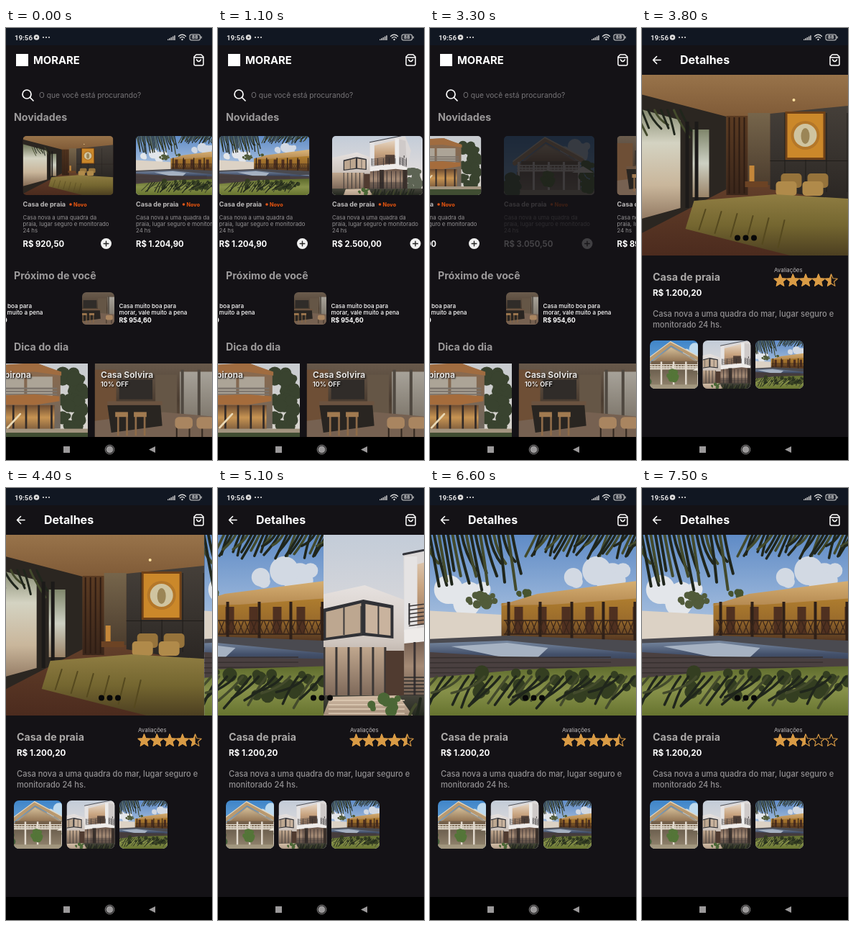
An HTML page that plays this animation: 287x600 px, repeating every 7700 ms.

```html
<!DOCTYPE html>
<html lang="pt">
<head>
<meta charset="utf-8">
<style>
html, body { margin: 0; width: 100%; height: 100%; overflow: hidden; background: #141216; }
svg { display: block; }
text { font-family: Inter, "Open Sans", sans-serif; white-space: pre; }
.clock { font-family: Roboto, sans-serif; }
.shade { text-shadow: 1px 1px 2px #000; }
</style>
</head>
<body>
<script>
const LOOP = 7700, BG = '#141216';
const rect = (x, y, w, h, fill, rx = 0) => `<rect x="${x}" y="${y}" width="${w}" height="${h}" rx="${rx}" fill="${fill}"/>`;
const poly = (points, fill) => `<polygon points="${points}" fill="${fill}"/>`;
const blob = (x, y, rx, ry, fill) => `<ellipse cx="${x}" cy="${y}" rx="${rx}" ry="${ry}" fill="${fill}"/>`;
const disc = (x, y, r, fill) => blob(x, y, r, r, fill);
const line = (d, stroke, w = 1, fill = 'none') =>
  `<path d="${d}" stroke="${stroke}" stroke-width="${w}" fill="${fill}" stroke-linecap="round" stroke-linejoin="round"/>`;
const text = (x, y, size, weight, fill, s, extra = '') =>
  `<text x="${x}" y="${y}" font-size="${size}" font-weight="${weight}" fill="${fill}" ${extra}>${s}</text>`;
const repeat = (n, f) => Array.from({ length: n }, (_, i) => f(i)).join('');
const random = seed => Math.abs(Math.sin(seed * 127.1 + 3) * 4375.85) % 1;

let defs = '', clips = 0;
const clip = (shape, body) => {
  const id = 'clip' + clips++;
  return `<clipPath id="${id}">${shape}</clipPath><g clip-path="url(#${id})">${body}</g>`;
};
const photo = (id, x, y, w, h, r = 0) =>
  clip(rect(x, y, w, h, '#000', r), `<use href="#${id}" x="${x}" y="${y}" width="${w}" height="${h}"/>`);
function shade(...colors) {
  const id = 'shade' + colors.join('').replaceAll('#', '');
  defs += `<linearGradient id="${id}" x2="0" y2="1">${
    colors.map((c, i) => `<stop offset="${i / (colors.length - 1)}" stop-color="${c}"/>`).join('')}</linearGradient>`;
  return `url(#${id})`;
}
const picture = (id, box, body) =>
  defs += `<symbol id="${id}" viewBox="${box}" preserveAspectRatio="xMidYMid slice">${body}</symbol>`;

// Scenery parts
const posts = (n, x, step, y, w, h, fill) => repeat(n, i => rect(x + i * step, y, w, h, fill));
const bars = (n, x, y, w, step, rise, stroke) => repeat(n, i => line(`M${x} ${y + i * step}l${w} ${rise}`, stroke, 1.5));
const leaves = (n, x, step, y, lean, length, w) => repeat(n, i => line(
  `M${x + i * step} ${y}q${lean / 3} ${length / 3} ${lean * (.5 + random(i))} ${length * (.45 + .55 * random(i + n))}`,
  i % 3 ? '#20261c' : '#434a2c', w));
const bush = (n, x, y, w, h, fill, r) => repeat(n, i => disc(x + w * random(i), y + h * random(i + 40), r * (.5 + random(i + 80)), fill));

picture('bedroom', '-59 65 384 251',
  rect(-59, 65, 384, 251, shade('#98734a', '#75502f', '#5f3c28', '#4c2b1e')) +
  poly('-59,80 107,123 107,224 -59,310', '#2b2621') +
  poly('-59,100 43,128 43,250 -59,278', shade('#6d7457', '#d4d3c2', '#c9b69b', '#846a54')) +
  rect(60, 141, 23, 94, shade('#7f866b', '#cdd0c3', '#9b8468')) +
  leaves(8, -20, 9, 114, 16, 40, 3) +
  posts(2, 50, 13, 130, 5, 120, '#1c1a19') + rect(107, 122, 30, 110, shade('#5b3b22', '#39251a')) +
  posts(4, 110, 7, 124, 2, 106, '#2d1c13') + rect(137, 118, 31, 100, shade('#76654b', '#4c3d2e')) +
  poly('168,119 325,103 325,250 168,224', shade('#46403a', '#292522')) +
  posts(4, 188, 29, 118, 1, 110, '#1f1c19') + rect(168, 184, 157, 1, '#1f1c19') +
  rect(189, 116, 56, 67, '#6f4117') + rect(192, 119, 50, 61, '#cb882a') +
  disc(217, 149, 20, '#b47729') + disc(217, 149, 16, '#cfc4a0') + blob(217, 150, 6, 11, '#9b8556') +
  rect(133, 213, 32, 8, '#6c4324') + rect(139, 191, 7, 22, '#c4873a') +
  repeat(4, i => rect(183 + i % 2 * 37 - (i >> 1) * 7, 202 + (i >> 1) * 11, 29, 20, i > 1 ? '#b08a4a' : '#96733b', 5)) +
  poly('62,240 175,231 325,240 325,318 196,316 50,279', shade('#8f7d42', '#746630', '#4a3d20')) +
  repeat(6, i => line(`M${78 + i * 22} ${252 + i * 3}l-9 ${28 + i * 2}`, '#55491f', 2)) +
  disc(201, 100, 2, '#ffe2a0'));

picture('pool', '-48 65 384 251',
  rect(-48, 65, 384, 251, shade('#5f8bc6', '#a9c1df', '#d7dce2')) +
  bush(9, 190, 112, 95, 22, '#d2d9e3', 14) + bush(8, -30, 138, 125, 22, '#e3e6ea', 14) +
  bush(18, 50, 148, 45, 14, '#515b3a', 5) + bush(6, 122, 142, 22, 8, '#47542f', 4) +
  poly('-48,168 100,176 100,211 -48,214', '#dcd2c5') +
  poly('100,160 336,146 336,216 100,208', shade('#b3812f', '#9c6d2c', '#4b3020')) +
  poly('98,163 150,147 336,123 336,150 170,162', shade('#dbb578', '#b58a52')) +
  posts(6, 118, 33, 165, 12, 38, '#4f3020') + posts(6, 108, 44, 158, 4, 54, '#2f2018') +
  repeat(26, i => line(`M${106 + i * 9} 185l7 17m0 -17l-7 17`, '#38251a', 1.2)) +
  bars(2, 104, 184, 232, 19, 0, '#2f2018') +
  poly('-48,212 110,205 336,214 336,232 -48,222', '#4a4a50') +
  poly('-48,217 108,212 336,234 336,250 100,238 -48,228', shade('#7889a1', '#43506a', '#323849')) +
  poly('30,220 108,215 165,222 150,236 100,235', '#a6b2c2') +
  poly('-48,225 100,234 336,238 336,252 130,252 -48,272', '#4a4040') +
  bars(4, -48, 236, 300, 7, -1, '#37302f') +
  poly('-48,268 130,252 336,246 336,316 -48,316', shade('#5d6a2c', '#87914a', '#66732f')) +
  bush(34, 40, 255, 260, 34, '#343e21', 7) + leaves(26, 10, 11, 262, -34, 44, 3.5) +
  leaves(26, -45, 6.4, 64, 14, 78, 4) + leaves(34, 150, 5.5, 62, -16, 36, 3.5));

picture('house', '-48 65 384 251',
  rect(-48, 65, 384, 251, shade('#c3ccd8', '#dbd9db', '#e9dfd6')) +
  bush(30, 272, 205, 60, 90, '#5d6454', 12) + bush(20, -48, 225, 55, 65, '#6b705d', 12) +
  poly('-48,158 58,135 115,156 115,292 -48,292', shade('#e6e1df', '#cfc6bf', '#8d7c6f')) +
  poly('0,168 56,155 98,163 98,209 56,205 0,212', '#303136') +
  poly('4,172 53,160 53,201 4,208', '#bda790') + poly('59,161 94,167 94,205 59,201', '#c9b39e') +
  posts(3, 28, 24, 164, 2, 40, '#3c3a3b') +
  rect(-48, 221, 135, 68, shade('#c0a78e', '#7d6859')) + posts(6, 0, 17, 221, 3, 68, '#3b3736') +
  rect(87, 226, 26, 62, '#503b30') +
  poly('112,93 262,66 287,127 270,205 113,212', '#dcd8d7') +
  poly('131,106 219,84 219,184 131,190', shade('#e6d5c2', '#c9a581', '#977660')) +
  rect(178, 145, 40, 38, '#57443a') + poly('236,79 264,86 268,192 236,184', '#cfcac9') +
  rect(113, 95, 18, 105, '#e5e3e3') + rect(219, 77, 17, 117, '#ecebeb') +
  line('M112 92L245 65', '#33343a', 3) + rect(256, 148, 3, 10, '#33302f') +
  posts(5, 119, 25, 160, 2, 30, '#29292c') + posts(3, 238, 14, 158, 2, 34, '#29292c') +
  bars(6, 120, 164, 100, 5.5, -13, '#343031') + bars(6, 238, 155, 30, 5.5, 13, '#343031') +
  poly('113,197 222,184 270,198 270,210 222,205 113,216', '#eeebe9') +
  poly('113,216 222,205 270,210 270,290 113,290', shade('#6c574b', '#a48a75', '#6d5b4e')) +
  posts(2, 153, 99, 209, 19, 80, '#3a302b') + posts(7, 126, 19, 214, 3, 76, '#393233') +
  bars(6, 113, 263, 142, 5, 0, '#2a2829') +
  rect(-48, 288, 384, 28, shade('#45443b', '#24281f')) +
  poly('10,290 105,288 125,316 0,316', shade('#d3bda6', '#a38d79')) + bars(4, 8, 295, 105, 6, 0, '#e0cdb7') +
  leaves(18, 120, 10, 318, 9, -30, 4) + bush(9, 62, 290, 50, 20, '#4b6736', 6));

picture('villa', '0 0 126 82',
  rect(0, 0, 126, 82, shade('#c7cbd0', '#d9d4cb')) + bush(42, 97, 12, 27, 56, '#39432f', 5) +
  poly('0,8 74,3 98,13 98,70 0,72', shade('#8d6a4c', '#6e675f')) +
  poly('0,7 73,3 99,12 99,16 72,12 0,15', '#a06c40') +
  posts(3, 6, 29, 17, 26, 20, '#aca497') + bars(3, 0, 29, 94, 3, 0, '#7b736b') +
  poly('0,37 72,35 97,37 97,42 72,46 0,45', '#a56c3c') +
  rect(0, 46, 92, 25, shade('#6e4c31', '#c79453', '#805e3d')) + posts(7, 10, 13, 46, 2, 25, '#332b28') +
  line('M44 69L57 55', '#ead9b5', 2) + rect(0, 70, 126, 5, '#a2947f') + rect(0, 74, 126, 8, '#404d32'));

picture('chalet', '0 0 126 82',
  rect(0, 0, 126, 82, shade('#3f85c9', '#98c3e4')) + bush(9, 80, 12, 42, 16, '#bfdaee', 7) +
  poly('22,38 58,10 106,36 106,82 16,82', '#a39683') +
  poly('58,12 100,36 26,38', shade('#d3bd97', '#8b6c4d')) + rect(24, 35, 80, 10, '#75614b') +
  line('M15 38L58 5L109 34', '#b9996f', 6) + line('M13 35L57 2L110 30', '#e6d7bd', 1.5) +
  bars(3, 19, 41, 89, 3.5, 0, '#ebe6dc') + posts(18, 20, 5, 41, 1, 8, '#e4ddd0') +
  rect(18, 50, 89, 28, shade('#6d604f', '#91836d')) + posts(5, 19, 21, 36, 3, 42, '#e2dace') +
  rect(0, 75, 126, 7, '#a2977f') + bush(16, 0, 56, 22, 22, '#43603a', 6) +
  bush(22, 52, 52, 18, 14, '#547538', 4) + bush(20, 106, 36, 20, 38, '#4c6d37', 5) +
  poly('95,51 110,42 125,51', '#ebe6da'));

picture('kitchen', '0 0 126 82',
  rect(0, 0, 126, 82, shade('#6b5c4d', '#4b3d31', '#67533f')) + rect(0, 10, 22, 72, '#6e4f36') +
  rect(25, 20, 34, 20, '#302c29') + rect(62, 15, 22, 42, '#655646') +
  rect(87, 12, 39, 46, shade('#a7a299', '#80796e')) + posts(3, 88, 17, 10, 3, 48, '#504941') +
  poly('0,62 70,53 126,58 126,82 0,82', '#766151') +
  poly('13,46 67,43 69,67 17,74', '#292521') + rect(13, 42, 56, 4, '#6b5340') +
  posts(4, 23, 9, 55, 2, 22, '#8e6b48') + posts(2, 21, 19, 53, 13, 5, '#a17a50') +
  posts(4, 83, 13, 66, 1.5, 13, '#332820') + repeat(2, i => rect(82 + i * 22, 58, 18, 12, '#a98560', 4)));

// Interface
const GREY = '#9b999a', SOFT = '#929092', WHITE = '#fff', GOLD = '#d99b45';
const ring = (x, y, r, stroke, w) => `<circle cx="${x}" cy="${y}" r="${r}" fill="none" stroke="${stroke}" stroke-width="${w}"/>`;
const lines = (x, y, step, size, weight, fill, rows) =>
  rows.map((s, i) => text(x, y + i * step, size, weight, fill, s)).join('');
const heading = (y, s) => text(11, y, 14.2, 700, GREY, s);
const bag = line('M262 40L265 37H272L275 40V50Q275 52 273 52H264Q262 52 262 50ZM262 41H275M265.5 44Q268.5 49 271.5 44', WHITE, 1.5);

const CARDS = { bedroom: '920,50', pool: '1.204,90', house: '2.500,00', villa: '1.100,90', chalet: '3.050,50', kitchen: '890,90' };
const card = ([id, price], i) => `<g id="${id}Card" transform="translate(${23.5 + i * 157.5})">` +
  photo(id, 0, 150, 126, 82, 5) + text(0, 248, 9, 700, '#bcbaba', 'Casa de praia') +
  disc(66.5, 245, 1.8, '#e2571b') + text(70.5, 248, 7.2, 800, '#d9500f', 'Novo') +
  lines(0, 266, 9.2, 7.8, 400, SOFT, ['Casa nova a uma quadra da', 'praia, lugar seguro e monitorado', '24 hs']) +
  text(0, 304, 11.3, 700, WHITE, 'R$ ' + price) +
  disc(116, 299.5, 7.5, '#f1f1f1') + line('M112.7 299.5h6.6m-3.3 -3.3v6.6', '#222', 1.4) + '</g>';

const nearby = x => photo('kitchen', x, 367, 45, 45, 6) +
  lines(x + 51.5, 389, 9, 8.1, 500, WHITE, ['Casa muito boa para', 'morar, vale muito a pena']) +
  text(x + 51.5, 409, 8.9, 700, WHITE, 'R$ 954,60');

const home = rect(0, 24, 287, 544, BG) +
  rect(14, 36, 17, 17, WHITE) + text(38, 50, 14.8, 700, WHITE, 'MORARE') + bag +
  ring(29, 92, 6, WHITE, 1.7) + line('M33.5 96.5L38 101', WHITE, 1.7) +
  text(46, 97, 10.2, 400, '#777578', 'O que você está procurando?') +
  heading(129, 'Novidades') + `<g id="row">${Object.entries(CARDS).map(card).join('')}</g>` +
  heading(349, 'Próximo de você') + nearby(-95) + nearby(106) + heading(448, 'Dica do dia') +
  photo('villa', -58, 466, 172, 102) + photo('kitchen', 123.5, 466, 172, 102) +
  text(35, 486, 12, 700, '#e6e4e2', 'Casa Ibirona', 'text-anchor="end" class="shade"') +
  text(132, 486, 12, 700, '#e6e4e2', 'Casa Solvira', 'class="shade"') +
  text(132, 498, 9.1, 600, WHITE, '10% OFF', 'class="shade"');

function star(x, fill) {
  const d = 'M' + Array.from({ length: 10 }, (_, i) => {
    const a = i * Math.PI / 5, r = i % 2 ? 4 : 9;
    return [x + r * Math.sin(a), 351 - r * Math.cos(a)];
  }).join('L') + 'Z';
  return line(d, GOLD, 1.1) + clip(rect(x - 10, 340, 20 * fill, 22, '#000'), line(d, GOLD, 1, GOLD));
}
const stars = score => repeat(5, i => star(192.5 + i * 17.8, Math.min(1, Math.max(0, score - i))));

const details = rect(0, 24, 287, 544, BG) +
  line('M26 44.5H15.5M20.5 39.5L15.5 44.5L20.5 49.5', WHITE, 1.6) + text(53, 50, 16, 700, WHITE, 'Detalhes') + bag +
  `<g id="pager">${['bedroom', 'pool', 'house'].map((id, i) => photo(id, i * 287, 65, 287, 251)).join('')}</g>` +
  repeat(3, i => disc(133 + i * 11.5, 291.5, 4, '#080808')) +
  text(15, 351, 14.2, 700, '#aaa8a7', 'Casa de praia') + text(15, 372, 11.6, 700, WHITE, 'R$ 1.200,20') +
  text(184, 339, 7.8, 400, '#bcbabb', 'Avaliações') + `<g id="high">${stars(4.5)}</g><g id="low">${stars(2.5)}</g>` +
  lines(15, 401, 15, 11.1, 500, SOFT, ['Casa nova a uma quadra do mar, lugar seguro e', 'monitorado 24 hs.']) +
  ['chalet', 'house', 'pool'].map((id, i) => photo(id, 11 + i * 73.5, 434, 67, 67, 7)).join('');

const statusBar = rect(0, 0, 287, 24, '#111722') + text(12, 16.5, 9.7, 600, '#e4e4e4', '19:56', 'class="clock"') +
  disc(42.5, 13, 3.8, '#ddd') + disc(42.5, 13, 1.2, '#222') + repeat(3, i => disc(52 + i * 4, 13, 1.1, '#ddd')) +
  repeat(5, i => rect(225 + i * 2.3, 15.5 - i * 1.3, 1.5, 1.5 + i * 1.3, '#ccc')) +
  line('M240.5 11.5q5 -4.5 10 0m-8 2.2q3 -2.7 6 0', '#ddd', 1.3) + disc(245.5, 16, 1.2, '#ddd') +
  rect(255.5, 8.5, 15.5, 9, '#ccc', 3) + rect(256.5, 9.5, 13.5, 7, '#222731', 2) + rect(271.5, 11.5, 1.3, 3, '#ccc') +
  text(263.2, 15.4, 6.3, 700, '#ddd', '88', 'text-anchor="middle"');

const navBar = rect(0, 568, 287, 32, '#000') + rect(80, 581, 9, 9, GREY) +
  disc(144.5, 585.5, 5, GREY) + ring(144.5, 585.5, 6.3, GREY, .9) + poly('199,585.5 208,581 208,590', GREY);

document.body.innerHTML = `<svg width="287" height="600" viewBox="0 0 287 600"><defs>${defs}</defs>
  <g id="home">${home}</g><g id="details">${details}</g>${statusBar}${navBar}</svg>`;

// Motion: each move has a start, an end, a change and an easing.
const linear = p => p, smooth = p => p * p * (3 - 2 * p), glide = p => 1 - (1 - p) ** 3;
const track = (t, base, moves) => moves.reduce((v, [a, b, change, ease]) =>
  v + change * ease(Math.min(1, Math.max(0, (t - a) / (b - a)))), base);

const ROW = [[300, 1100, 179.5, glide], [1200, 2570, 371, glide]];
const PRESS = [[3100, 3250, -.8, linear], [3400, 3600, .8, linear]];
const PAGE = [[3500, 3800, 1, smooth]];
const PAGER = [[4330, 4930, 287, smooth], [5000, 5500, 287, glide], [6000, 6600, -287, smooth]];
const RATED = 6900;

const $ = id => document.getElementById(id);
const slide = (id, x) => $(id).setAttribute('transform', `translate(${-x})`);
const fade = (id, v) => $(id).setAttribute('opacity', v);

function draw() {
  const t = Math.floor(Math.min(performance.now() % LOOP, 7500) / 100) * 100;
  slide('row', track(t, 0, ROW));
  slide('pager', track(t, 0, PAGER));
  fade('chaletCard', track(t, 1, PRESS));
  fade('details', track(t, 0, PAGE));
  fade('high', +(t < RATED));
  fade('low', +(t >= RATED));
  requestAnimationFrame(draw);
}
draw();
</script>
</body>
</html>
```
